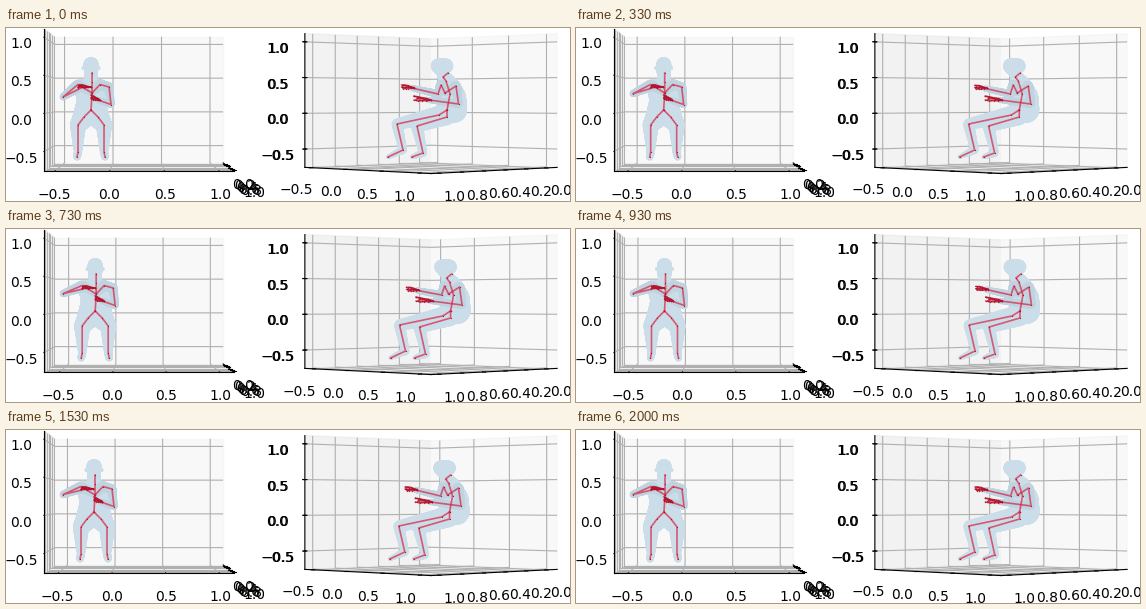
Write a matplotlib script that moves like this. It is 564 px wide and 173 px high and loops after 2070 ms.

```python
import numpy as np
import matplotlib.pyplot as plt
from matplotlib.animation import FuncAnimation

W, H, DPI = 564, 173, 100
FRAMES, STEP = 30, 69
SIDE = 277.2                      # edge of one square 3D axes, px
SKIN, SLEEVE = "#cbdde9", "#bfd3e1"
BONE, JOINT = "#d8213f", "#b3122c"
HALVES = np.linspace(-0.5, 1, 4)

fig = plt.figure(figsize=(W / DPI, H / DPI), dpi=DPI)


def make_box(x, y, azim, elev):
    """3D axes whose box is centred on pixel (x, y)."""
    pad = SIDE * 0.95 / 1.85
    ax = fig.add_axes([(x - pad) / W, (H - y - pad) / H, SIDE / W, SIDE / H],
                      projection="3d")
    ax.patch.set_visible(False)
    ax.view_init(elev=elev, azim=azim)
    ax.set(xlim=(-0.115, 1.068), zlim=(-0.757, 1.115))
    ax.set(xticks=np.linspace(0, 1, 6), yticks=HALVES, zticks=HALVES)
    return ax


front_box = make_box(133, 71.8, 0, 0)
side_box = make_box(425, 72.5, 45, 0.01)

# the height labels of the side box are printed twice, a pixel apart
echo = make_box(426, 72.5, 45, 0.01)
echo.set(xticks=[], yticks=[])
echo.grid(False)
for axis in (echo.xaxis, echo.yaxis, echo.zaxis):
    axis.set_pane_color((1, 1, 1, 0))
    axis.line.set_visible(False)

stage = fig.add_axes([0, 0, 1, 1])


def flesh(pts, color=SKIN, z=1):
    """Tapered tube through (x, y, radius) points."""
    pts = np.array(pts, float)
    s = np.linspace(0, len(pts) - 1, 30 * len(pts))
    x, y, r = (np.interp(s, range(len(pts)), col) for col in pts.T)
    stage.scatter(x, y, s=(1.44 * r) ** 2, c=color, lw=0, zorder=z)


def bones(pts):
    x, y = np.array(pts, float).T[:2]
    stage.plot(x, y, color=BONE, lw=1.2, alpha=0.7, zorder=4)
    stage.plot(x, y, ".", color=JOINT, ms=1.8, mew=0, zorder=5)


def limb(pts, color=SKIN, z=1):
    flesh(pts, color, z)
    bones(pts)


def hand(x, y, length, drop, spread, seed):
    """Five fingers fanning out to the left of the wrist."""
    rng = np.random.default_rng(seed)
    s = np.linspace(0, 1, 5)
    for k in range(-2, 3):
        fx = x + length * (0.5 - s * rng.uniform(0.8, 1))
        fy = y + drop * (0.5 - s) + k * spread * np.sqrt(s) + rng.uniform(-0.5, 0.5, 5)
        stage.plot(fx, fy, ".-", color=JOINT, lw=0.9, ms=2, mew=0, alpha=0.85, zorder=6)


def front_view(d, rise):
    c = 85 + d
    flesh([(c, 36.5, 7.5), (c, 42, 7), (c, 54, 6)])
    flesh([(c - 7.5, 40, 2), (c + 7.5, 40, 2)])
    for s in (-1, 1):
        flesh([(c + 9 * s, 59, 8), (c + 6 * s, 72, 8), (c + 7 * s, 89, 11)])
        limb([(c, 82, 8), (c + 7 * s, 89, 11), (c + 13 * s, 97, 8),
              (c + 13 * s, 124, 4), (c + 14 * s, 129, 3.5)])
    chest = (c + 1, 65, 3)
    bones([(c + 1, 45), (c + 1, 54), chest[:2], (c, 82)])
    limb([chest, (c - 13, 56.5, 5), (57, 69 - 4.5 * rise, 3.5), (c - 8, 59, 3)],
         SLEEVE, 2)
    limb([chest, (c + 9, 56.5, 5), (c + 18, 59, 4.5), (c + 20, 76.5, 3.5),
          (c + 7, 72, 3)], SLEEVE, 2)
    hand(c - 7, 58.5, 13, 1, 0.7, 3)
    hand(c + 4, 70.5, 9, 3, 1, 5)


def side_view(d, pulse):
    x, foot = 440 + 0.85 * d, 400 + 0.6 * d
    flesh([(x - 8, 38, 7.3), (x, 38, 7.3)])
    flesh([(x - 6, 40, 7), (x - 4, 45, 5), (x + 3, 58, 10), (x + 6, 70, 14),
           (x + 8, 82, 13)])
    limb([(x + 1, 82, 9), (x - 7, 87, 9), (foot - 9, 96, 5.5), (foot - 3, 122, 4),
          (foot - 18, 129, 2)])
    limb([(x + 1, 82, 9), (x + 1, 89, 8), (foot + 11, 98, 6), (foot + 17, 125, 4),
          (foot + 6, 129, 2)])
    bones([(x + 2, 45), (x - 3, 49), (x, 53), (x + 4, 66), (x + 1, 82)])
    ax, ay = 401 + 1.2 * d, 59 + 1.5 * pulse
    bx, by = 416 + 0.5 * d, 71
    chest = (x - 1, 65, 3)
    limb([chest, (x - 5, 57, 5), (x - 8, 66, 4), (ax + 5, ay + 1, 3)], SLEEVE, 2)
    limb([chest, (x + 10, 58, 5), (x + 12.5, 76, 4), (bx + 7, by + 1, 3)], SLEEVE, 2)
    hand(ax, ay, 13, 1, 1, 7)
    hand(bx, by, 17, 2, 1.2, 9)


def draw(i):
    t = i * STEP / 1000
    rise = 1 - np.exp(-t / 0.2)
    pulse = np.exp(-((t - 0.6) / 0.3) ** 2)
    d = 3 * rise + 1.4 * pulse            # sideways sway, px
    for box in (front_box, side_box):
        box.set_ylim(-0.6 - 0.011 * d, 1.136)
    stage.clear()
    stage.set(xlim=(0, W), ylim=(H, 0))
    stage.axis("off")
    front_view(d, rise)
    side_view(d, pulse)


anim = FuncAnimation(fig, draw, frames=FRAMES, interval=STEP, repeat=True,
                     repeat_delay=0, init_func=lambda: None)
plt.show()
```
